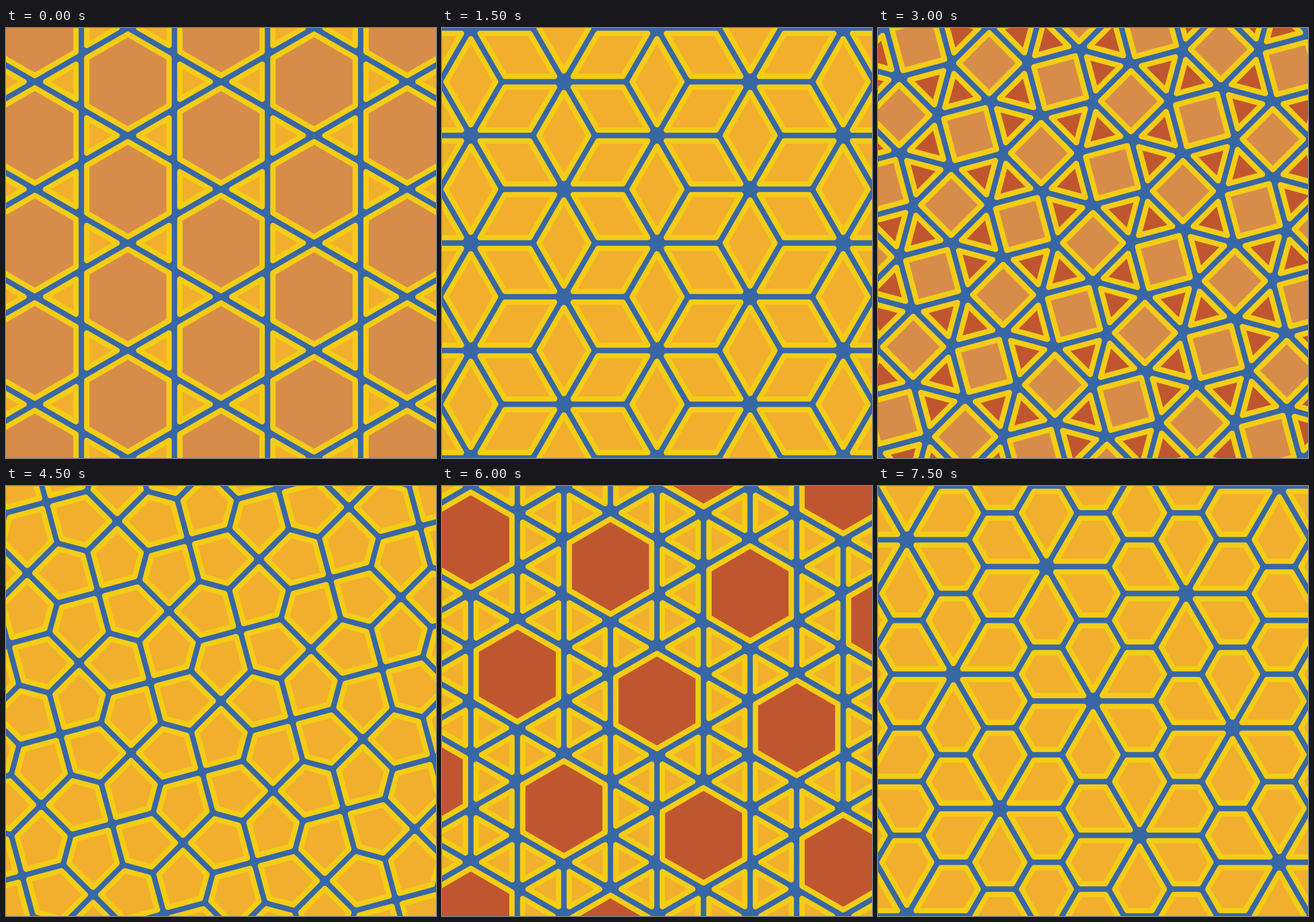
Recreate the animation shown at these times as an HTML page with a canvas. Size 748 by 748 pixels, loop 8 s.

```html
<!DOCTYPE html>
<html lang="en">
<head>
<meta charset="utf-8">
<title>Tilings and their duals</title>
<style>
  html, body { margin: 0; width: 100%; height: 100%; overflow: hidden; background: #3867a5; }
  canvas { display: block; width: 748px; height: 748px; }
</style>
</head>
<body>
<canvas id="stage" width="748" height="748"></canvas>
<script>
const SIZE = 748, HOLD = 1500, LOOP = 8000;
const SIDE = SIZE / 8, LINE = SIDE / 10;
const BLUE = '#3867a5', YELLOW = '#f3cd16', LIGHT = '#f2ae2d', TAN = '#d78c49', RED = '#c0562f';
const ctx = document.getElementById('stage').getContext('2d');

const polar = (r, deg) => [r * Math.cos(deg * Math.PI / 180), r * Math.sin(deg * Math.PI / 180)];
const add = (...pts) => pts.reduce((a, b) => [a[0] + b[0], a[1] + b[1]]);
const mul = (p, k) => [p[0] * k, p[1] * k];
const mean = (...pts) => mul(add(...pts), 1 / pts.length);
const range = (n, f) => Array.from({ length: n }, (_, k) => f(k));
const regular = (n, r, deg, c = [0, 0]) => range(n, k => add(c, polar(r, deg + k * 360 / n)));
const tile = (color, ...pts) => ({ color, pts });

// Six steps of one side length, clockwise from straight up
const step = k => polar(SIDE, 60 * k - 90);
const hexagon = regular(6, SIDE, -90);
const fan = (p, k) => [p, add(p, step(k)), add(p, step(k + 1))];

function trihexagonal() {
  return {
    basis: [[0, 2 * SIDE], mul(add(step(1), step(2), step(2), step(2)), 0.5).map((v, i) => i ? SIDE : 2 * v)].map((b, i) =>
      i ? add(step(2), step(2)) : b),
    tiles: [tile(TAN, ...hexagon), tile(LIGHT, ...fan(step(0), 1)), tile(LIGHT, ...fan(step(0), 4))]
  };
}

function rhombille() {
  const { basis } = trihexagonal();
  const wing = SIDE / Math.sqrt(3);
  const tiles = range(3, k => {
    const tip = step(k), across = polar(wing, 60 * k);
    return tile(LIGHT, [0, 0], add(tip, across), mul(tip, 2), add(tip, mul(across, -1)));
  });
  return { basis, tiles };
}

const squareRadius = SIDE / Math.SQRT2;
const squareStep = SIDE * Math.sqrt(2 + Math.sqrt(3));
const squareBasis = [polar(squareStep, 60), polar(squareStep, -30)];
const otherSquare = mul(add(...squareBasis), 0.5);

function snubSquare() {
  const apex = (SIDE + SIDE * Math.sqrt(3)) / 2;
  const tiles = range(4, k => tile(RED, polar(squareRadius, 90 * k),
    polar(squareRadius, 90 * k + 90), polar(apex, 90 * k + 45)));
  tiles.push(tile(TAN, ...regular(4, squareRadius, 0)),
    tile(TAN, ...regular(4, squareRadius, 30, otherSquare)));
  return { basis: squareBasis, tiles };
}

function cairo() {
  const wing = SIDE / Math.sqrt(3);
  const near = SIDE / 2 + SIDE * Math.sqrt(3) / 6;
  const reach = Math.hypot(...otherSquare), tilt = 15;
  const tiles = range(4, k => {
    const a = 90 * k;
    return tile(LIGHT, [0, 0], polar(near, a - 45),
      add(polar(squareRadius, a), polar(wing, a - 45)),
      polar(reach, a + tilt), polar(near, a + 45));
  });
  return { basis: squareBasis, tiles };
}

const snubHexBasis = [add(step(1), step(2), step(2)), add(step(2), step(3), step(3))];

function snubHexagonal() {
  const rim = range(6, k => tile(LIGHT, step(k), step(k + 1), add(step(k), step(k + 1))));
  const free = range(2, k => tile(LIGHT, ...fan(step(k), k)));
  return { basis: snubHexBasis, tiles: [tile(RED, ...hexagon), ...rim, ...free] };
}

function floret() {
  const tiles = range(6, k => tile(LIGHT, [0, 0],
    ...[1, 0, -1, -2].map(j => mean(...fan(step(k), k + j)))));
  return { basis: snubHexBasis, tiles };
}

const scenes = [trihexagonal, rhombille, snubSquare, cairo, snubHexagonal, floret].map(f => f());

function unit(from, to) {
  const d = [to[0] - from[0], to[1] - from[1]];
  return mul(d, 1 / Math.hypot(...d));
}

// Moves every edge of a convex polygon inwards by d
function inset(pts, d) {
  const n = pts.length;
  return pts.map((p, i) => {
    const u = unit(p, pts[(i + n - 1) % n]), w = unit(p, pts[(i + 1) % n]);
    return add(p, mul(add(u, w), d / Math.abs(u[0] * w[1] - u[1] * w[0])));
  });
}

function draw({ basis: [a, b], tiles }) {
  ctx.setTransform(1, 0, 0, 1, 0, 0);
  ctx.fillStyle = BLUE;
  ctx.fillRect(0, 0, SIZE, SIZE);
  ctx.strokeStyle = YELLOW;
  ctx.lineWidth = LINE;
  ctx.lineJoin = 'round';
  const shapes = tiles.map(t => ({ color: t.color, pts: inset(t.pts, LINE) }));
  const far = SIZE / 2 + 3 * SIDE;
  for (let i = -9; i <= 9; i++) {
    for (let j = -9; j <= 9; j++) {
      const [x, y] = add(mul(a, i), mul(b, j));
      if (Math.abs(x) > far || Math.abs(y) > far) continue;
      ctx.setTransform(1, 0, 0, 1, SIZE / 2 + x, SIZE / 2 + y);
      for (const { color, pts } of shapes) {
        ctx.beginPath();
        pts.forEach(p => ctx.lineTo(...p));
        ctx.closePath();
        ctx.fillStyle = color;
        ctx.fill();
        ctx.stroke();
      }
    }
  }
}

let shown = -1;
const start = performance.now();
function frame() {
  const now = Math.floor((performance.now() - start) % LOOP / HOLD);
  if (now !== shown) draw(scenes[shown = now]);
  requestAnimationFrame(frame);
}
frame();
</script>
</body>
</html>
```
